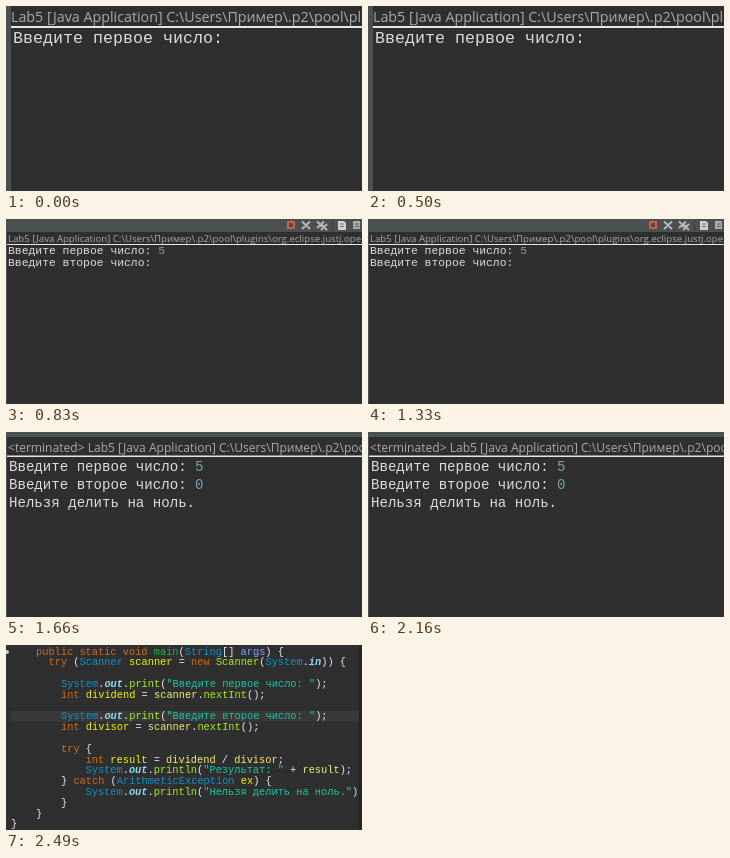
These frames come from a looping animation (356x185 px, 3.32 s). An HTML page:

```html
<!DOCTYPE html>
<html lang="ru">
<head>
<meta charset="utf-8">
<title>Console</title>
<style>
  html, body { margin: 0; width: 100%; height: 100%; overflow: hidden; background: #2f2f2f; }
  svg { display: block; width: 356px; height: 185px; }
  text { white-space: pre; }
  .scene { visibility: hidden; animation: show 3320ms step-end infinite; }
  .s2 { animation-delay: -2490ms; }
  .s3 { animation-delay: -1660ms; }
  .s4 { animation-delay: -830ms; }
  @keyframes show {
    0% { visibility: visible; }
    25%, 100% { visibility: hidden; }
  }
  .bar { fill: #4b5052; }
  .rule { fill: #e6e6e6; }
  .title { font-family: "Open Sans", "Noto Sans", sans-serif; fill: #aaa; }
  .mono { font-family: "Liberation Mono", "Courier New", monospace; fill: #dcdcdc; }
  .in { fill: #7d9fb5; }
  .x { fill: none; stroke: #b4b7b8; stroke-width: 2; }

  /* syntax colours */
  .code { font-size: 10.33px; fill: #e6e6fa; }
  .key { fill: #cc6c1d; }
  .type { fill: #1290c3; }
  .def { fill: #1eb540; }
  .call { fill: #a7ec21; }
  .var { fill: #f2f200; }
  .use { fill: #f3ec79; }
  .arg { fill: #79abff; }
  .str { fill: #17c6a3; }
  .stat { fill: #8ddaf8; font-weight: bold; font-style: italic; }
</style>
</head>
<body>
<svg viewBox="0 0 356 185">
  <rect width="356" height="185" fill="#2f2f2f"/>

  <g class="scene s1">
    <rect class="bar" width="5" height="185"/>
    <rect class="rule" x="5" y="20" width="351" height="2"/>
    <text class="title" x="5" y="16" font-size="14.28">Lab5 [Java Application] C:\Users\Пример\.p2\pool\plugins</text>
    <text class="mono" x="7" y="37" font-size="16.67">Введите первое число:</text>
  </g>

  <g class="scene s2">
    <path class="bar" d="M0 0H356V13H1V185H0Z"/>
    <rect class="rule" x="1" y="25" width="355" height="1"/>
    <path d="M282 3H288V9H282Z" fill="none" stroke="#d0603f" stroke-width="2"/>
    <path class="x" d="M296 2.5L304 10M304 2.5L296 10M311 2.5L318 9M318 2.5L311 9M315 5L321 11M321 5L315 11"/>
    <rect x="326" y="1" width="1" height="11" fill="#383c3e"/>
    <path d="M332 2H338L340 4V11H332Z" fill="#d0d2d2"/>
    <path d="M334 5H338M334 7.5H338" stroke="#65737c"/>
    <path d="M347 2H354V10H347Z" fill="#a9adaf"/>
    <path d="M349 5H353M349 7.5H353" stroke="#596269"/>
    <text class="title" x="2" y="23" font-size="9.65">Lab5 [Java Application] C:\Users\Пример\.p2\pool\plugins\org.eclipse.justj.openjdk</text>
    <g class="mono" font-size="11.38">
      <text x="2" y="35">Введите первое число: <tspan class="in">5</tspan></text>
      <text x="2" y="47">Введите второе число:</text>
    </g>
  </g>

  <g class="scene s3">
    <path class="bar" d="M0 0H356V5H1V185H0Z"/>
    <rect class="rule" x="1" y="23.5" width="355" height="1.5"/>
    <text class="title" x="2" y="19.5" font-size="12.07">&lt;terminated> Lab5 [Java Application] C:\Users\Пример\.p2\pool\plugins</text>
    <g class="mono" font-size="14.1">
      <text x="3" y="38.5">Введите первое число: <tspan class="in">5</tspan></text>
      <text x="3" y="57">Введите второе число: <tspan class="in">0</tspan></text>
      <text x="3" y="75">Нельзя делить на ноль.</text>
    </g>
  </g>

  <g class="scene s4">
    <rect x="5" y="66" width="348" height="10.5" fill="#393939"/>
    <rect x="353" width="3" height="185" fill="#232323"/>
    <circle cx="1" cy="7" r="2" fill="#b9d3d8"/>
    <g class="mono code">
      <text x="30" y="9.5"><tspan class="key">public static void</tspan> <tspan class="def">main</tspan>(<tspan class="type">String</tspan>[] <tspan class="arg">args</tspan>) {</text>
      <text x="42.5" y="20.3"><tspan class="key">try</tspan> (<tspan class="type">Scanner</tspan> <tspan class="var">scanner</tspan> = <tspan class="key">new</tspan> <tspan class="call">Scanner</tspan>(<tspan class="type">System</tspan>.<tspan class="stat">in</tspan>)) {</text>
      <text x="55" y="41.9"><tspan class="type">System</tspan>.<tspan class="stat">out</tspan>.<tspan class="call">print</tspan>(<tspan class="str">"Введите первое число: "</tspan>);</text>
      <text x="55" y="52.7"><tspan class="key">int</tspan> <tspan class="var">dividend</tspan> = <tspan class="use">scanner</tspan>.<tspan class="call">nextInt</tspan>();</text>
      <text x="55" y="74.3"><tspan class="type">System</tspan>.<tspan class="stat">out</tspan>.<tspan class="call">print</tspan>(<tspan class="str">"Введите второе число: "</tspan>);</text>
      <text x="55" y="85.1"><tspan class="key">int</tspan> <tspan class="var">divisor</tspan> = <tspan class="use">scanner</tspan>.<tspan class="call">nextInt</tspan>();</text>
      <text x="55" y="106.7"><tspan class="key">try</tspan> {</text>
      <text x="79.5" y="117.5"><tspan class="key">int</tspan> <tspan class="var">result</tspan> = <tspan class="use">dividend</tspan> / <tspan class="use">divisor</tspan>;</text>
      <text x="79.5" y="128.3"><tspan class="type">System</tspan>.<tspan class="stat">out</tspan>.<tspan class="call">println</tspan>(<tspan class="str">"Результат: "</tspan> + <tspan class="use">result</tspan>);</text>
      <text x="55" y="139.1">} <tspan class="key">catch</tspan> (<tspan class="type">ArithmeticException</tspan> <tspan class="var">ex</tspan>) {</text>
      <text x="79.5" y="149.9"><tspan class="type">System</tspan>.<tspan class="stat">out</tspan>.<tspan class="call">println</tspan>(<tspan class="str">"Нельзя делить на ноль."</tspan>)</text>
      <text x="55" y="160.7">}</text>
      <text x="30" y="171.5">}</text>
      <text x="5" y="182.3">}</text>
    </g>
  </g>
</svg>
</body>
</html>
```
